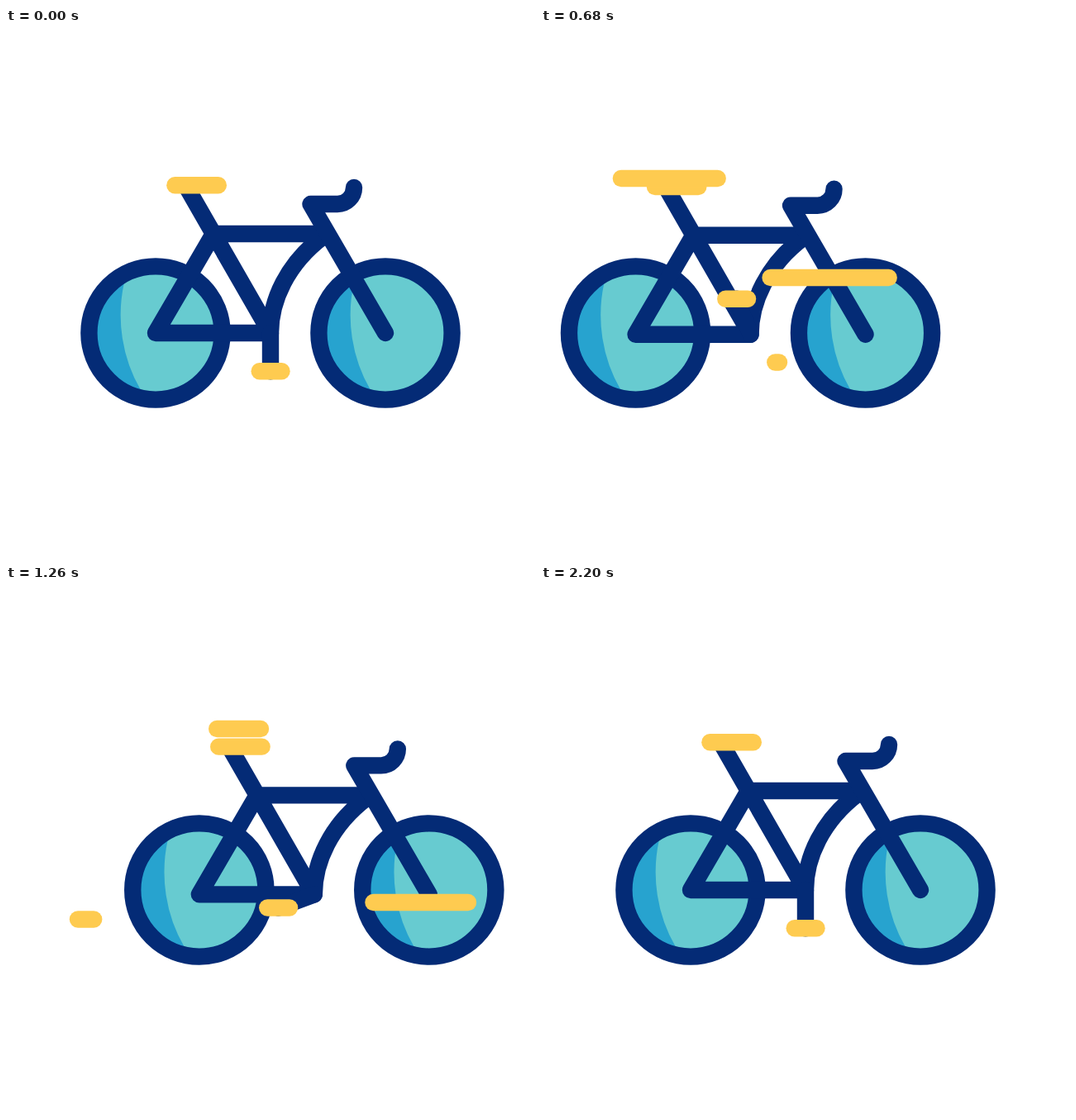
Recreate the animation shown at these times as an HTML page. Size 640 px wide and 640 px high, loop 2.42 s.

```html
<!DOCTYPE html>
<html lang="en">
<head>
<meta charset="utf-8">
<title>Bicycle</title>
<style>
  html, body { margin: 0; width: 100%; height: 100%; overflow: hidden; background: #fff; }
  svg { display: block; width: 100%; height: 100%; }
  .line { fill: none; stroke: #042b76; stroke-width: 20.4; stroke-linecap: round; stroke-linejoin: round; }
  .gold { stroke: #fecb50; }
</style>
</head>
<body>
<svg viewBox="0 0 640 640">
  <defs>
    <g id="wheel">
      <circle r="76" fill="#27a3cf"/>
      <path fill="#67cbd0" d="M-38-61A181 181 0 0 0-18 69A71.6 71.6 0 1 0-38-61"/>
      <circle class="line" r="80.6"/>
    </g>
  </defs>
  <g id="bike">
    <use href="#wheel" x="181" y="369"/>
    <use href="#wheel" x="459" y="369"/>
    <g id="frame">
      <path class="line" d="M220 195L320 369H181L251 249H383M320 369C320 330 340 285 384 252"/>
      <path class="line" d="M459 369L368.5 213H401A20 20 0 0 0 421 193"/>
      <path class="line gold" d="M204.4 190.3H256.8"/>
      <path id="crank" class="line" stroke-linecap="butt"/>
      <path id="pedal" class="line gold" d="M306.7 0H333.5"/>
    </g>
  </g>
  <g id="streaks"></g>
</svg>
<script>
const LOOP = 2420;
const $ = id => document.getElementById(id);
const clamp = v => Math.min(1, Math.max(0, v));
const ease = v => (1 - Math.cos(Math.PI * clamp(v))) / 2;

// Keys are [time, value].
const slide = [[110, 0], [607, -69.5], [1358, 58], [2005, 0]];
const spin = [[100, 0], [300, 22], [680, 158], [1020, 338], [1260, 429], [1580, 624], [2190, 720]];

// Each streak: [start time, y, right x, left x].
const streaks = [
  [243, 182, 259, 95],
  [380, 302, 421, 220],
  [635, 404.5, 288, 87],
  [1005, 384, 559, 358],
  [1100, 174, 308, 107],
  [1293, 233, 569, 368]
].map(data => {
  const path = document.createElementNS('http://www.w3.org/2000/svg', 'path');
  path.setAttribute('class', 'line gold');
  $('streaks').append(path);
  return { path, data };
});

function easedKeys(keys, t) {
  let value = keys[0][1];
  for (let i = 1; i < keys.length; i++) {
    const [t0, v0] = keys[i - 1], [t1, v1] = keys[i];
    value += (v1 - v0) * ease((t - t0) / (t1 - t0));
  }
  return value;
}

// Smooth curve through the keys, at rest at both ends.
function smoothKeys(keys, t) {
  const last = keys.length - 1;
  if (t <= keys[0][0]) return keys[0][1];
  if (t >= keys[last][0]) return keys[last][1];
  const i = keys.findIndex(k => k[0] > t) - 1;
  const slope = j => j < 1 || j >= last ? 0 :
    (keys[j + 1][1] - keys[j - 1][1]) / (keys[j + 1][0] - keys[j - 1][0]);
  const [t0, v0] = keys[i], [t1, v1] = keys[i + 1];
  const span = t1 - t0, u = (t - t0) / span, w = 1 - u;
  return v0 * w * w * (1 + 2 * u) + v1 * u * u * (1 + 2 * w)
    + span * u * w * (slope(i) * w - slope(i + 1) * u);
}

function draw(t) {
  const bob = 3.95 * (1 - Math.cos(2 * Math.PI * 3 * clamp((t - 100) / 2058)));
  $('bike').setAttribute('transform', `translate(${easedKeys(slide, t)})`);
  $('frame').setAttribute('transform', `translate(0 ${bob})`);

  const angle = smoothKeys(spin, t) * Math.PI / 180;
  const dx = -46.2 * Math.sin(angle), dy = 46.2 * Math.cos(angle);
  $('crank').setAttribute('d', `M320 369l${dx} ${dy}`);
  $('pedal').setAttribute('transform', `translate(${dx} ${369 + dy})`);

  for (const { path, data: [start, y, right, left] } of streaks) {
    const at = v => right + (left - right) * ease(v);
    const age = t - start;
    const shown = age > 0 && age < 710;
    path.setAttribute('d', shown ? `M${at((age - 290) / 420)} ${y}H${at(age / 470) - .01}` : '');
  }
}

const begin = performance.now();
function tick() {
  draw((performance.now() - begin) % LOOP);
  requestAnimationFrame(tick);
}
tick();
</script>
</body>
</html>
```
